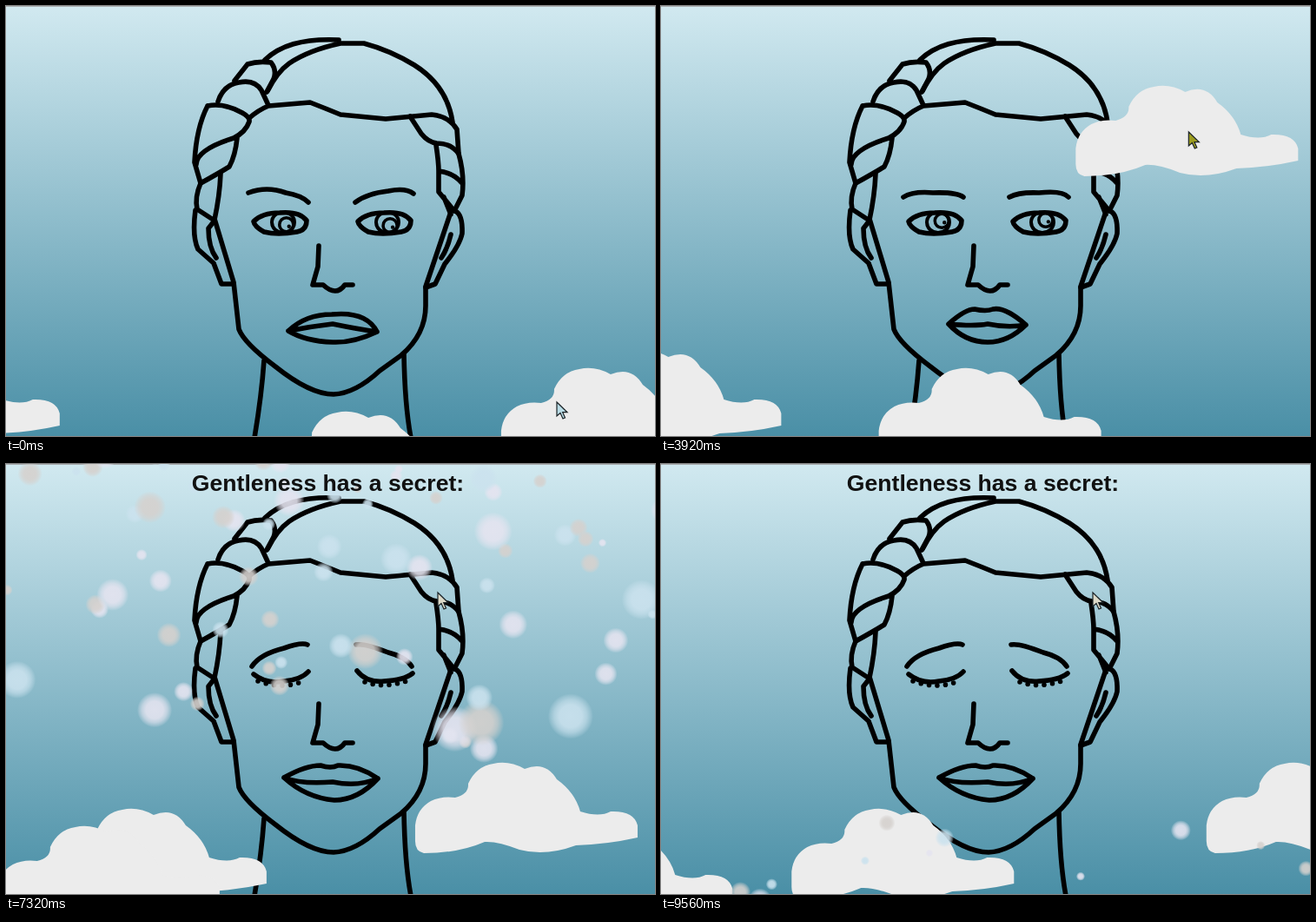
Animation of 747x495 px, one loop 9.6 s. Source, as an HTML page:

```html
<!DOCTYPE html>
<html lang="en">
<head>
<meta charset="utf-8">
<title>Gentleness</title>
<style>
  html, body { margin: 0; width: 100%; height: 100%; overflow: hidden; }
  svg { display: block; width: 747px; height: 495px; }
  .ink { fill: none; stroke: #000; stroke-width: 5.6; stroke-linecap: round; stroke-linejoin: round; }
  .iris { stroke-width: 4; }
  .lash { stroke-dasharray: 0 9.5; }
  .cloud { fill: #ececec; }
  text { font: bold 26.6px "Liberation Sans", Arial, sans-serif; fill: #111; }
</style>
</head>
<body>
<svg viewBox="0 0 747 495">
  <defs>
    <linearGradient id="sky" x2="0" y2="1">
      <stop stop-color="#d1e9f0"/><stop offset="1" stop-color="#4a8fa6"/>
    </linearGradient>
    <path id="cloud" d="M0 72Q2 53 18 44Q30 38 46 40Q62 36 61 24Q70 4 90 1Q108 -3 126 7Q150 -3 163 19Q184 34 190 56Q212 63 225 56Q252 55 256 72V86Q220 94 185 95Q150 108 120 100Q95 90 80 91Q50 104 10 104Q0 102 0 90Z"/>
    <path id="eye" d="M285 248Q295 238 315 238Q338 236 346 247Q346 258 335 260Q312 264 297 260Q286 254 285 248Z"/>
    <clipPath id="lid"><use href="#eye"/></clipPath>
  </defs>
  <rect width="747" height="495" fill="url(#sky)"/>
  <rect width="747" height="1" fill="#a9adaf"/>

  <g class="ink">
    <!-- hair and braid -->
    <path d="M298 62C315 46 340 37 383 39M301 98Q312 76 326 66Q348 51 385 43H412Q442 51 470 68Q508 92 514 134"/>
    <path d="M280 129Q290 120 302 115L350 111Q368 118 385 125L437 130L490 125Q510 127 519 142L521 170Q528 195 525 218L518 232"/>
    <path d="M263 86L278 67Q290 63 305 65Q312 74 308 84L300 99M244 110Q250 91 268 88Q286 84 294 97L301 112"/>
    <path d="M232 115Q250 111 272 123Q281 128 280 133Q276 145 262 152Q220 165 219 182M232 115Q219 140 217 180L224 204Q244 193 257 185Q264 172 266 152"/>
    <path d="M224 204Q217 220 220 234L240 247M247 193Q246 218 240 246"/>
    <path d="M465 127L478 147Q486 157 496 158Q512 158 521 170M495 160Q498 180 498 190Q515 192 524 203M498 190V214L516 236M504 220L512 240"/>
    <!-- face, ears, neck -->
    <path d="M240 245L262 318L268 372Q274 388 310 415Q350 447 377 447Q402 446 430 420L455 402Q483 378 483 345V323L511 240"/>
    <path d="M218 235Q214 265 221 280L239 296L248 320H262M240 247L233 256Q233 278 242 290M515 235Q526 238 525 262Q522 276 505 297L494 320L483 324M512 263Q508 280 501 290"/>
    <path d="M297 408Q294 450 286 497M458 400Q459 460 466 497"/>
    <path d="M360 276L359 300L353 321H365Q380 335 390 321H399"/>
    <path id="brows"/><path id="mouth"/>
    <g id="open">
      <g class="gaze"><use href="#eye"/><g class="iris" clip-path="url(#lid)"></g></g>
      <g class="gaze" transform="translate(120)"><use href="#eye"/><g class="iris" clip-path="url(#lid)"></g></g>
    </g>
    <g id="closed">
      <path d="M285 242Q300 254 320 250Q340 248 348 239M404 238Q415 252 435 250Q458 249 468 241"/>
      <path class="lash" d="M290 250Q318 260 342 250M413 251Q435 259 464 249"/>
    </g>
  </g>

  <g class="cloud" id="clouds"></g>
  <g id="bubbles"></g>
  <text id="line" x="370.5" y="31" text-anchor="middle">Gentleness has a secret:</text>
  <path id="cursor" d="M0 0V16L4 12.5L7 19L9.5 18L6.7 11.7H12Z" stroke="#1a2226" stroke-width="1.2"/>
</svg>
<script>
// All times are in seconds.
const LOOP = 9.6, GRAB = 2.4, DROP = 5.45, TITLE = 5.6;
const $ = id => document.getElementById(id);
const make = (tag, attrs, parent) => {
  const el = document.createElementNS('http://www.w3.org/2000/svg', tag);
  for (const k in attrs) el.setAttribute(k, attrs[k]);
  return parent.appendChild(el);
};
const move = (el, x, y) => el.setAttribute('transform', `translate(${x.toFixed(2)} ${y.toFixed(2)})`);
const show = (el, on) => el.style.display = on ? '' : 'none';
const clamp = p => Math.min(1, Math.max(0, p));
const mix = (a, b, p) => a + (b - a) * p;

const moods = [
  { from: 0, tint: '#b9dce6',
    brows: 'M279 215Q300 207 322 215Q340 218 348 226M402 226Q415 216 440 213Q460 209 469 216',
    mouth: 'M325 374Q345 355 375 355Q415 351 427 375Q400 388 376 387Q345 386 325 374ZQ350 369 376 366Q405 372 427 375' },
  { from: GRAB, tint: '#9c9c20',
    brows: 'M279 220Q290 213 313 215Q340 214 348 220M401 220Q412 214 435 215Q462 212 469 220',
    mouth: 'M331 366Q350 349 361 349Q374 352 382 349Q396 346 420 367Q400 387 376 387Q350 387 331 366ZQ360 369 376 366Q400 371 420 367' },
  { from: DROP, tint: '#dcd9c8',
    brows: 'M283 233Q292 219 320 212Q340 205 347 208M403 208Q412 206 440 217Q460 222 467 233',
    mouth: 'M320 361Q345 347 362 347Q374 351 382 347Q405 346 428 362Q405 387 378 387Q345 384 320 361ZQ340 369 376 366Q405 372 428 362' }
];

// The pointer's path: waits, picks up a cloud, lifts it over the head, lets go.
const stops = [
  { t: 1.6, x: 634, y: 456 },
  { t: GRAB, x: 604, y: 481 },
  { t: 2.8, x: 596, y: 430 },
  { t: 3.9, x: 610, y: 146 },
  { t: 5, x: 470, y: 91 },
  { t: DROP, x: 470, y: 91 },
  { t: 6.2, x: 497, y: 148 }
];
function pointer(t) {
  const i = Math.max(1, stops.findIndex(s => s.t >= t));
  const [a, b] = t > stops.at(-1).t ? stops.slice(-2) : [stops[i - 1], stops[i]];
  const p = clamp((t - a.t) / (b.t - a.t));
  return { x: mix(a.x, b.x, p), y: mix(a.y, b.y, p) };
}

// The held cloud drifts, hangs from the pointer, then sinks while drifting on.
function heldCloud(t) {
  const drift = 70;
  if (t < GRAB) return [291 + drift * t, 467];
  if (t < DROP) {
    const { x, y } = pointer(t);
    return [x - 130, y - 53];
  }
  const p = clamp((t - DROP) / 0.85);
  return [340 + drift * (t - DROP), mix(38, 344, p * p * (3 - 2 * p))];
}
const paths = [
  t => [-249 + 47.5 * Math.abs(t - 1.155), 397],
  t => [570 - 84 * t + 0.65 * t * t, 417],
  t => [719 + 46 * Math.abs(t - 6.6), 422],
  heldCloud
];
const clouds = paths.map(path => ({ path, el: make('use', { href: '#cloud' }, $('clouds')) }));

const eyes = [...document.querySelectorAll('.gaze')].map((g, i) => {
  const iris = g.querySelector('.iris'), x = 319, y = 249;
  make('ellipse', { cx: x, cy: y, rx: 13, ry: 12 }, iris);
  const pupil = make('g', {}, iris);
  make('circle', { cx: x, cy: y, r: 8, 'stroke-width': 3.5 }, pupil);
  make('circle', { cx: x + 3, cy: y + 2, r: 1.2, 'stroke-width': 2 }, pupil);
  return { x: x + 120 * i, y, pupil };
});

const COUNT = 80, START_Y = -35, GRAVITY = 129;
const colors = ['#e5e4f0', '#d5d1ce', '#cbe2ee'];
colors.forEach((color, i) => {
  const grad = make('radialGradient', { id: 'soft' + i }, document.querySelector('defs'));
  [[0, .92], [.5, .88], [.72, .62], [.9, .25], [1, 0]].forEach(([offset, opacity]) =>
    make('stop', { offset, 'stop-color': color, 'stop-opacity': opacity }, grad));
});

let seed = 7;
const random = () => (seed = seed * 16807 % 2147483647) / 2147483647;
for (let i = 0; i < 9; i++) random();

// Early bubbles may be large, late ones stay small; only large ones drift.
const bubbles = Array.from({ length: COUNT }, (_, i) => {
  const late = i / COUNT;
  const r = 4 + 7 * random() + 22 * (1 - late) * random() ** 3;
  return {
    born: 4.95 + 2 * late,
    x: 747 * random(),
    drift: r > 14 ? 100 * (random() - 0.5) : 0,
    el: make('circle', { r: r * 1.1, fill: `url(#soft${i % 3})` }, $('bubbles'))
  };
});

function draw(t) {
  const mood = moods.findLast(m => t >= m.from);
  $('brows').setAttribute('d', mood.brows);
  $('mouth').setAttribute('d', mood.mouth);
  $('cursor').setAttribute('fill', mood.tint);
  show($('open'), t < DROP);
  show($('closed'), t >= DROP);
  show($('line'), t >= TITLE);

  clouds.forEach(c => move(c.el, ...c.path(t)));

  const { x, y } = pointer(t);
  move($('cursor'), x, y);
  eyes.forEach(e => {
    const a = Math.atan2(y - e.y, x - e.x);
    move(e.pupil, 4.5 * Math.cos(a), 5 * Math.sin(a));
  });

  bubbles.forEach(b => {
    const age = t - b.born;
    show(b.el, age > 0);
    move(b.el, b.x + b.drift * age, START_Y + GRAVITY / 2 * age * age);
  });
}

const start = performance.now();
(function tick() {
  draw((performance.now() - start) / 1000 % LOOP);
  requestAnimationFrame(tick);
})();
</script>
</body>
</html>
```
